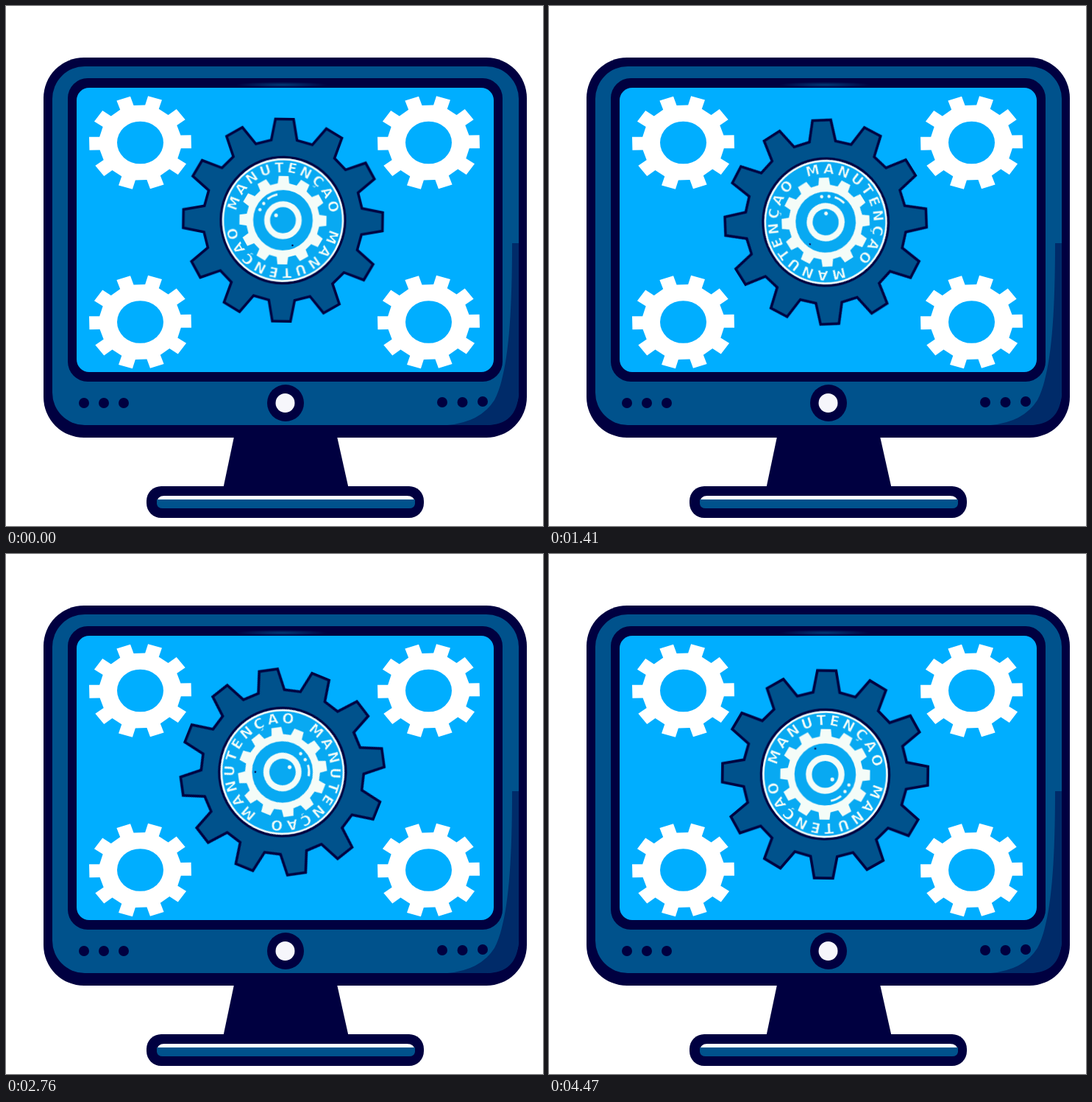
An HTML page that plays this animation: 730 by 706 pixels, repeating every 4.5 s.

```html
<!DOCTYPE html>
<html lang="pt">
<head>
<meta charset="utf-8">
<title>Manutenção</title>
<style>
  html, body { margin: 0; width: 100%; height: 100%; overflow: hidden; background: #fff; }
  svg { display: block; width: 730px; height: 706px; }
  :root { --navy: #000040; --steel: #00528c; --sky: #00aeff; }
  .navy { fill: var(--navy); }
  .steel { fill: var(--steel); }
  .sky { fill: var(--sky); }
  .white { fill: #fff; }
  .disc { fill: #08a9f2; }
  .cream { fill: #f4fcf8; }
  .line { fill: none; stroke: #f4fcf8; }
  .rim { stroke: var(--navy); stroke-width: 3.5; }
  text {
    font: bold 18.5px "DejaVu Sans", Verdana, sans-serif;
    letter-spacing: 3.7px;
    text-anchor: middle;
    fill: #f4fcf8;
    stroke: #08a9f2;
    stroke-width: .6px;
  }
  .drift, .spin { transform-origin: 0 0; animation: 4500ms steps(150, jump-none) infinite; }
  .drift { animation-name: drift; }
  .spin { animation-name: spin; }
  @keyframes drift {
    from { transform: translate(376.5px, 290.8px) scale(1, 1.014); }
    to { transform: translate(375.4px, 299.2px) scale(1.031, 1.04); }
  }
  @keyframes spin {
    from { transform: rotate(.9deg); }
    to { transform: rotate(180.9deg); }
  }
</style>
</head>
<body>
<svg viewBox="0 0 730 706">
  <defs>
    <path id="arc" d="M-64.3 0A64.3 64.3 0 0 1 64.3 0"/>
    <g id="cog">
      <path class="white" data-gear="10 70 56 8.1 10 -1.2"/>
      <circle class="sky" r="31.5"/>
    </g>
    <radialGradient id="glow">
      <stop offset="0" stop-color="#00528c" stop-opacity=".7"/>
      <stop offset="1" stop-color="#00528c" stop-opacity="0"/>
    </radialGradient>
  </defs>

  <!-- stand -->
  <path class="navy" d="M311 580H449L466 656H295Z"/>
  <rect class="navy" x="191" y="652" width="377" height="43" rx="20"/>
  <path class="white" d="M205 674Q206 665 215 665H545Q555 665 556 674Z"/>
  <path class="steel" d="M205 670H556V676Q555 682 548 682H213Q206 682 205 676Z"/>

  <!-- case -->
  <rect class="navy" x="51" y="70" width="657" height="516" rx="55"/>
  <rect class="steel" x="63" y="82" width="634" height="487" rx="44"/>
  <path fill="#002b69" d="M688 322H697V525Q695 569 653 569H600Q645 565 664 535C682 500 688 430 688 322Z"/>
  <rect class="navy" x="84" y="98" width="591" height="412" rx="27"/>
  <ellipse cx="375" cy="107" rx="62" ry="4" fill="url(#glow)"/>
  <rect class="sky" x="96" y="111" width="567" height="386" rx="17"/>
  <g class="navy">
    <circle cx="106" cy="539" r="7"/>
    <circle cx="133" cy="539" r="7"/>
    <circle cx="160" cy="539" r="7"/>
    <circle cx="593" cy="538" r="7"/>
    <circle cx="620.5" cy="538" r="7"/>
    <circle cx="648" cy="537" r="7"/>
    <circle cx="380" cy="539" r="25"/>
  </g>
  <circle cx="379.5" cy="539" r="13" fill="#f6f6fb"/>

  <!-- corner cogs -->
  <use href="#cog" transform="translate(182.5 185.5) scale(1 .915)"/>
  <use href="#cog" transform="translate(574.5 185.5) scale(1 .915)"/>
  <use href="#cog" transform="translate(182.5 429) scale(1 .915)"/>
  <use href="#cog" transform="translate(574.5 429) scale(1 .915)"/>

  <!-- turning gear -->
  <g class="drift"><g class="spin">
    <path class="steel rim" data-gear="12 136 108.5 5.2 9.3 0"/>
    <circle class="disc rim" r="84.3"/>
    <circle class="line" r="81.5" stroke-width="2.6"/>
    <text><textPath href="#arc" startOffset="51%">MANUTENÇAO</textPath></text>
    <text transform="rotate(180)"><textPath href="#arc" startOffset="51%">MANUTENÇAO</textPath></text>
    <path class="cream" data-gear="12 59.5 50 6.4 9 0"/>
    <circle class="disc" r="40.5"/>
    <circle class="line" r="21.5" stroke-width="8"/>
    <circle class="cream" cx="-9.5" cy="-6.5" r="2.5"/>
    <circle class="cream" cx="-31.5" cy="-13.5" r="2.2"/>
    <circle class="cream" cx="-26.5" cy="-22" r="2.2"/>
    <path class="line" d="M-21.5 -28Q-15 -33 -8 -34.5" stroke-width="2.8"/>
    <circle class="navy" cx="13.5" cy="33.5" r="1.2"/>
  </g></g>
</svg>
<script>
  // Toothed outline: count, tip and root radius, tip and root half angle, phase (degrees)
  function gear(n, tip, root, tipHalf, rootHalf, phase) {
    const at = (r, deg) => {
      const a = deg * Math.PI / 180;
      return (r * Math.cos(a)).toFixed(2) + ' ' + (r * Math.sin(a)).toFixed(2);
    };
    const points = [];
    for (let i = 0; i < n; i++) {
      const a = phase + i * 360 / n;
      points.push(at(root, a - rootHalf), at(tip, a - tipHalf), at(tip, a + tipHalf), at(root, a + rootHalf));
    }
    return 'M' + points.join('L') + 'Z';
  }
  for (const path of document.querySelectorAll('[data-gear]')) {
    path.setAttribute('d', gear(...path.dataset.gear.split(' ').map(Number)));
  }
</script>
</body>
</html>
```
